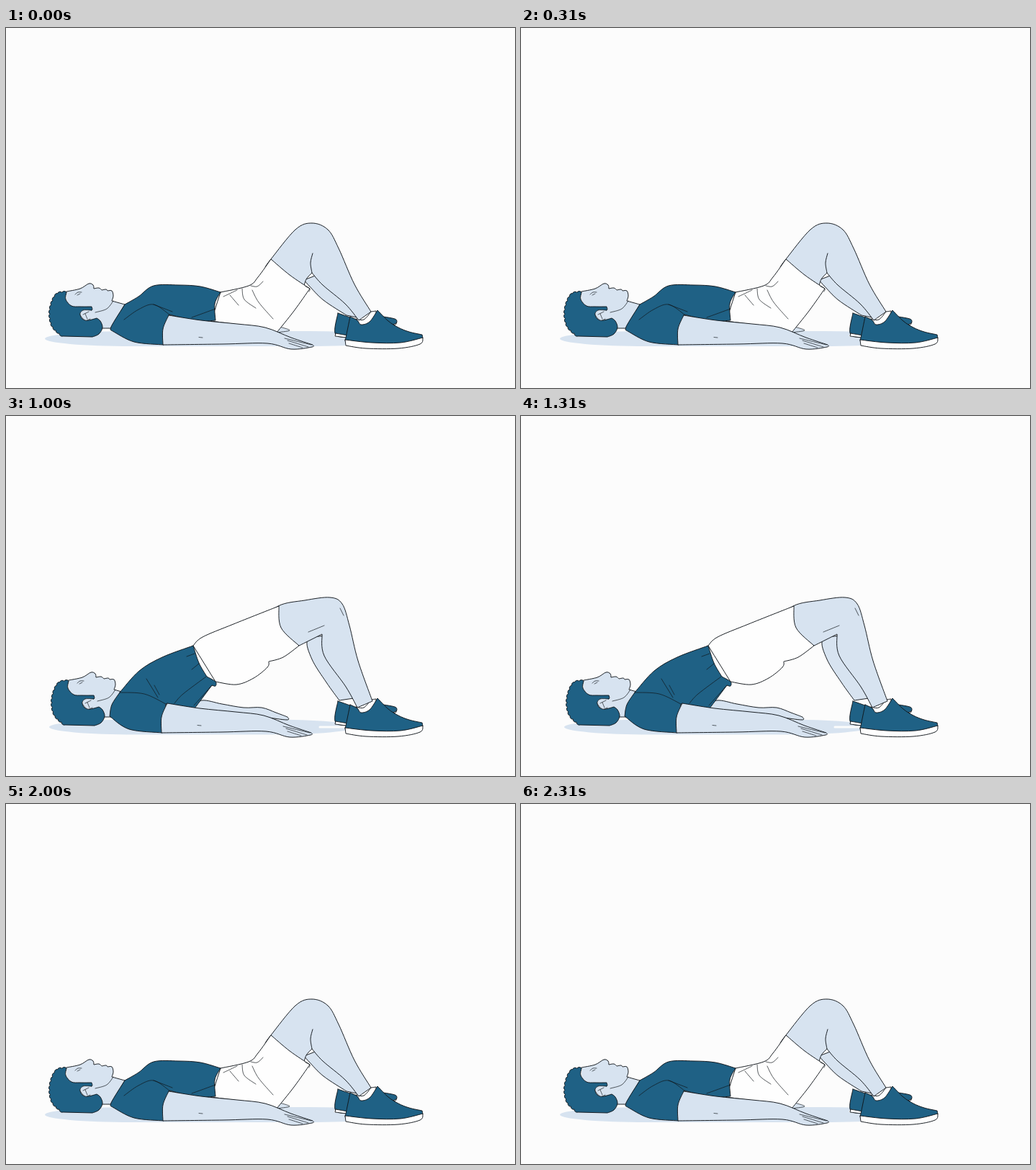
Recreate the animation shown at these times as an HTML page. Size 707 by 500 pixels, loop 2520 ms.

```html
<!DOCTYPE html>
<html lang="en">
<head>
<meta charset="utf-8">
<title>Glute bridge</title>
<style>
  html, body { margin: 0; width: 100%; height: 100%; overflow: hidden; background: #fcfcfc; }
  svg { display: block; width: 707px; height: 500px; }
  path { stroke: #10161b; stroke-width: .95; stroke-linejoin: round; stroke-linecap: round; fill: none; }
  .skin { fill: #d7e3f0; }
  .teal { fill: #1f6185; }
  .white { fill: #fefefe; }
  .fold { stroke-width: .7; }
  .streak { stroke: #fcfcfc; stroke-width: 3; }
  .pose { opacity: 0; animation: 2520ms step-end infinite; }
  #low { animation-name: low; }
  #mid { animation-name: mid; }
  #high { animation-name: high; }
  @keyframes low { 0%, 79.365%, 100% { opacity: 1; } 20.634% { opacity: 0; } }
  @keyframes mid { 0%, 39.682%, 79.365%, 100% { opacity: 0; } 20.634%, 60.317% { opacity: 1; } }
  @keyframes high { 0%, 60.317%, 100% { opacity: 0; } 39.682% { opacity: 1; } }
</style>
</head>
<body>
<!-- data-p: smooth runs through key points; "|" is a corner, "/" lifts the pen -->
<svg viewBox="0 0 707 500">
  <defs>
    <g id="head">
      <path class="skin" data-p="84,366 103,362 115,355 121,357 122,362 | 129,361 133,364 | 139,363 141,365 | 147,365 149,372 147,379 | 165,384 | 146,417 | 131,417 | 85,398"/>
      <path class="fold" data-p="149,379 140,390 124,395 / 96,370 100,367 105,367 / 99,371 103,369"/>
      <path class="teal" data-curl="84,367 71,369 64,381 61,397 65,415 79,428" data-p="120,429 129,425 134,416 131,407 126,403 | 114,406 106,404 103,397 107,392 | 119,392 119,387 | 103,387 91,386 83,377 84,367"/>
      <path class="skin fold" data-p="118,392 107,392 103,398 110,406 117,404"/>
      <path class="fold" data-p="115,394 107,398 / 110,397 113,404"/>
    </g>
    <g id="feet">
      <path class="teal" data-p="461,396 478,402 | 486,429 | 458,426 461,396"/>
      <path class="white" data-p="458,424 475,427 | 475,430 457,428 | 458,424"/>
      <path class="white" data-p="541,406 542,411 534,415"/>
      <path class="teal" data-p="518,400 540,404 543,409 | 534,413 520,410"/>
      <path class="white" data-p="486,404 497,405 507,394 | 514,393 | 512,409 492,414 | 486,404"/>
      <path class="teal" data-p="478,401 488,406 493,412 505,408 516,392 | 531,407 545,416 560,422 578,426 | 579,431 | 545,439 471,435 | 478,401"/>
      <path class="white" data-p="471,433 508,437 548,437 579,430 | 575,439 545,445 500,445 472,441 | 471,433"/>
    </g>
    <g id="arm">
      <path class="skin" data-p="225,399 270,406 320,411 359,416 395,430 425,440 | 424,443 395,446 362,438 300,439 217,440 | 217,418 225,399"/>
      <path class="fold" data-p="390,434 419,443 / 392,438 411,444 / 386,431 423,440 / 267,429.5 272,430"/>
    </g>
    <path id="farArm" class="skin" data-p="255,406 272,395 300,400 330,405 355,405 375,412 391,418 | 390,422 357,418 316,414"/>
  </defs>

  <g id="low" class="pose">
    <rect class="skin" x="54" y="421" width="486" height="21" rx="120" ry="10.5"/>
    <path class="streak" data-p="457,427 475,427"/>
    <path class="skin fold" data-p="380,415 394,420 375,423"/>
    <path class="skin" data-p="440,340 | 414,350 | 421,358 441,378 473,399 | 488,402"/>
    <use href="#feet"/>
    <path class="skin" data-p="360,332 | 368,321 402,280 425,271 447,280 462,306 484,356 507,394 | 490,406 | 471,383 440,357 425,340 | 417,349 413,362 | 380,350"/>
    <path data-p="426,313 423,326 425,340"/>
    <use href="#head"/>
    <path class="white" data-p="298,367 337,358 350,346 368,321 | 394,343 422,362 | 400,393 376,423 | 335,414 285,407 | 298,367"/>
    <path class="fold" data-p="416,359 422,362 421,366 / 311,371 323,385 / 328,362 331,377 347,389 / 340,358 349,359 357,352 / 342,364 351,381 371,404 / 302,373 321,364"/>
    <path class="teal" data-p="165,384 184,373 205,358 240,357 270,359 298,367 | 290,383 291,406 | 265,407 227,398 | 219,440 | 178,436 148,421 | 146,415 165,384"/>
    <path class="fold" data-p="164,405 184,391 205,384 227,398 / 205,384 231,394 / 291,390 258,402"/>
    <use href="#arm" x="1"/>
  </g>

  <g id="mid" class="pose">
    <rect class="skin" x="57" y="421.5" width="428" height="21" rx="120" ry="10.5"/>
    <path class="streak" data-p="457,433 475,432"/>
    <path class="skin" data-p="440,322 | 417,326 424,348 445,371 466,398 | 487,402"/>
    <use href="#feet"/>
    <path class="skin" data-p="345,315 | 360,297 390,277 434,260 456,270 466,294 484,348 510,395 | 490,405 | 479,398 458,365 434,338 430,318 | 403,347 | 370,350"/>
    <path class="fold" data-p="432,304 430,320 / 428,307 410,320"/>
    <use href="#farArm"/>
    <use href="#head" x="2"/>
    <path class="white" data-p="283,348 316,339 325,329 360,297 | 368,317 405,348 | 402,353 375,384 351,406 316,413 | 280,405 | 283,348"/>
    <path class="fold" data-p="295,346 297,350 / 320,337 323,345 / 334,332 340,342 / 400,344 405,348"/>
    <path class="teal" data-p="160,384 182,367 208,350 245,350 283,348 | 283,373 295,408 | 262,408 224,399 | 218,440 | 172,435 145,418 | 147,403 160,384"/>
    <path class="fold" data-p="160,384 192,385 224,399 / 283,371 257,386 / 285,380 248,400 / 282,359 270,364 / 231,388 241,397 / 292,399 289,408"/>
    <use href="#arm"/>
  </g>

  <g id="high" class="pose">
    <rect class="skin" x="60" y="421.5" width="425" height="21" rx="120" ry="10.5"/>
    <path class="streak" data-p="436,432 475,432"/>
    <path class="skin" data-p="445,305 | 419,311 425,338 445,370 463,395 | 483,392"/>
    <use href="#feet"/>
    <path class="skin" data-p="350,290 | 378,264 415,256 450,252 467,261 477,291 489,340 509,396 | 488,405 | 472,376 442,333 439,303 | 407,319 | 370,325"/>
    <path class="fold" data-p="442,291 420,300 / 464,267 469,277"/>
    <use href="#farArm"/>
    <use href="#head" x="3" y="1"/>
    <path class="white" data-p="260,319 273,307 316,289 379,264 | 382,294 407,319 | 385,335 365,341 | 363,349 344,364 320,373 291,369 | 260,319"/>
    <path class="teal" data-p="158,384 185,354 217,335 260,319 | 268,343 279,362 | 291,369 291,375 286,374 | 262,406 | 222,400 | 217,440 | 171,435 144,417 | 147,401 158,384"/>
    <path class="fold" data-p="158,384 192,386 222,400 / 195,365 211,391 / 206,374 213,387 / 278,362 246,386 234,399 / 286,374 261,402 / 268,344 258,352 / 262,330 251,334"/>
    <use href="#arm" x="-1"/>
  </g>
</svg>
<script>
  const parse = s => s.trim().split(/\s+/).map(p => p.split(',').map(Number));

  // Catmull-Rom run as cubic Béziers
  const run = pts => pts.slice(1).map((c, i) => {
    const b = pts[i], a = pts[i - 1] || b, d = pts[i + 2] || c;
    const h1 = b.map((v, k) => v + (c[k] - a[k]) / 6);
    const h2 = c.map((v, k) => v - (d[k] - b[k]) / 6);
    return `C${h1} ${h2} ${c}`;
  }).join('');

  const smooth = s => s.split('/').map(stroke => {
    let last = null, d = '';
    for (const pts of stroke.split('|').map(parse)) {
      d += last ? run([last, ...pts]) : 'M' + pts[0] + run(pts);
      last = pts.at(-1);
    }
    return d;
  }).join('');

  // Even scallops along a smooth guide line
  const scallop = (s, size = 6.5) => {
    const guide = document.createElementNS('http://www.w3.org/2000/svg', 'path');
    guide.setAttribute('d', smooth(s));
    const len = guide.getTotalLength(), n = Math.round(len / size), r = size * .58;
    const at = i => { const { x, y } = guide.getPointAtLength(len * i / n); return `${x},${y}`; };
    let d = 'M' + at(0);
    for (let i = 1; i <= n; i++) d += `A${r} ${r} 0 0 0 ${at(i)}`;
    return d;
  };

  for (const el of document.querySelectorAll('path')) {
    const { p, curl } = el.dataset;
    el.setAttribute('d', curl ? scallop(curl) + smooth(p).replace('M', 'L') : smooth(p));
  }
</script>
</body>
</html>
```
